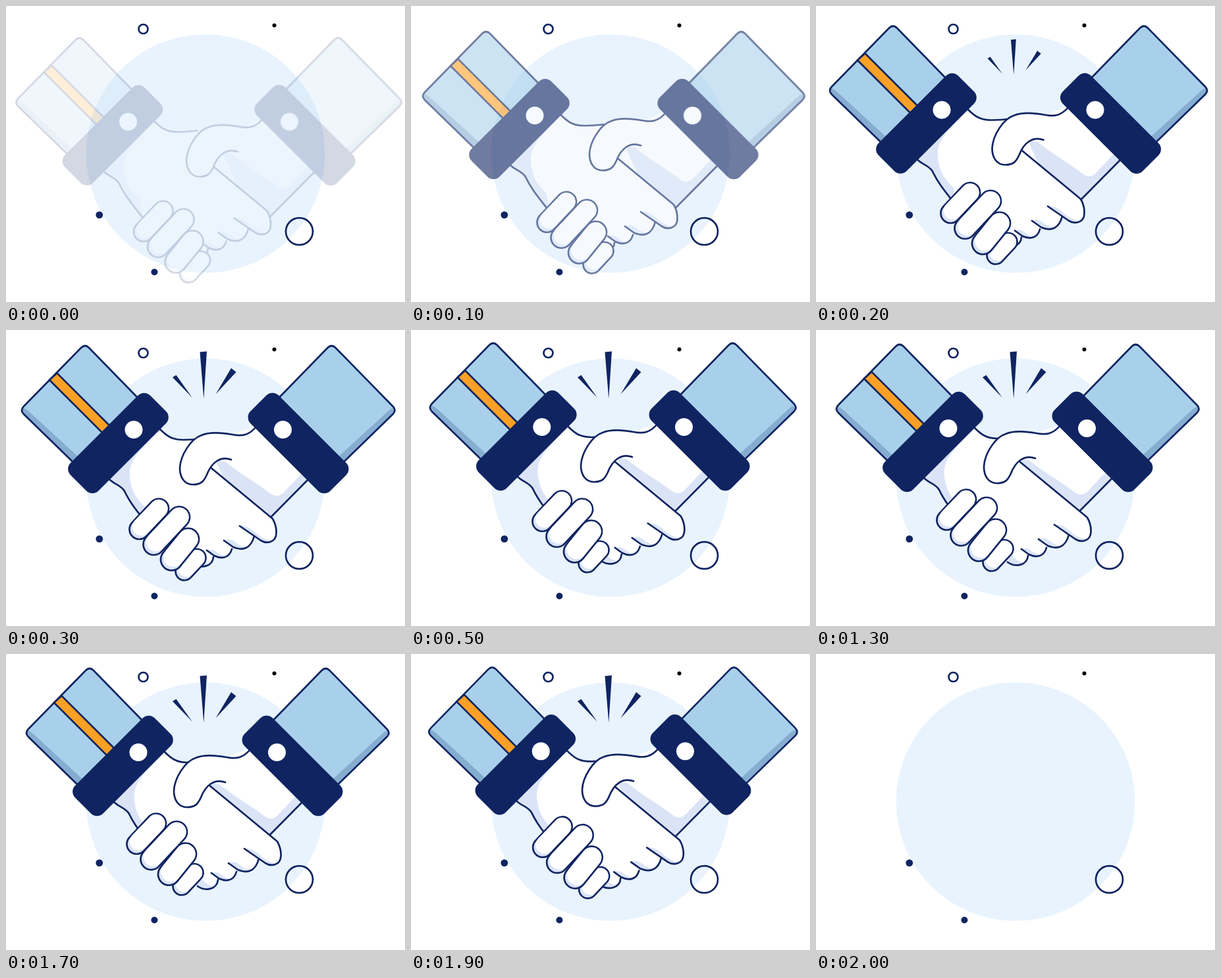
An HTML page for the animation above (2300 ms loop, 606x450 px).

```html
<!DOCTYPE html>
<html lang="en">
<head>
<meta charset="utf-8">
<title>Handshake</title>
<style>
  html, body { margin: 0; width: 100%; height: 100%; overflow: hidden; background: #fff; }
  svg { display: block; width: 100vw; height: 100vh; }
  .line { fill: none; stroke: #0f2461; stroke-width: 2.7; stroke-linecap: round; stroke-linejoin: round; }
  .navy { fill: #0f2461; }
  .white { fill: #fff; }
  .shade { fill: #dbe4f7; }
</style>
</head>
<body>
<svg viewBox="0 0 606 450">
  <defs>
    <g id="sleeve">
      <path fill="#a9d0eb" d="M206 100L133 25Q127 19 121 25L34 114Q28 120 34 126L110 200Z"/>
      <path fill="#86add0" d="M32 117Q29 121 34 126L108 199L116 190L42 122Q35 116 32 117Z"/>
      <path class="line" d="M206 100L133 25Q127 19 121 25L34 114Q28 120 34 126L110 200"/>
    </g>
    <g id="cuff">
      <rect class="navy" x="-85.5" y="-30" width="171" height="60" rx="13" transform="translate(177.5 170) rotate(-45)"/>
      <circle class="white" cx="201" cy="149.5" r="13.5"/>
    </g>
  </defs>

  <circle cx="303" cy="224.5" r="181.3" fill="#e8f3fd"/>
  <circle class="line" cx="208.5" cy="35" r="7"/>
  <circle cx="407.5" cy="29.5" r="3"/>
  <circle class="navy" cx="141.8" cy="317.6" r="5.4"/>
  <circle class="navy" cx="225.4" cy="404.5" r="5"/>
  <circle class="line" cx="445.5" cy="342.7" r="20.5"/>

  <g id="rays" class="navy">
    <path d="M253 72L258.500 68.500L283 103Z" data-tip="283 103"/>
    <path d="M294.500 33.500L305 32.500L300.300 104.500Z" data-tip="300.300 104.500"/>
    <path d="M342 58L349.500 64L318.500 97.500Z" data-tip="318.500 97.500"/>
  </g>

  <g id="shake">
    <g class="right">
      <path class="white" d="M372 143L335 157L300 170L290 215L345 275L378 298L452 223Z"/>
      <path class="shade" d="M309 196L324 198C345 216 372 230 393 247Q402 254 412 246L440 216L452 223L378 298L345 275Z"/>
      <path class="line" d="M452 223L378 298"/>
      <g transform="translate(612.5 0) scale(-1 1)">
        <use href="#sleeve"/><use href="#cuff"/>
      </g>
    </g>

    <g class="left">
      <path class="white" d="M240 148C250 158 258 165 276 165C290 165 298 164 306 163L308 199L400 275L412 285
        C416 292 418 299 417.500 307C417 322 402 323 394 318L384 310C380 331 366 334 352 328
        L350 331C346 346 333 346 323 341C322 357 304 362 291 353L223 295
        C205 272 195 260 187 243C182 234 172 233 164 225Z"/>
      <path class="shade" d="M236 150C216 180 192 192 195 222C197 242 205 255 219 268L223 295C205 272 195 260 187 243C182 234 172 233 164 225Z"/>
      <g class="shade">
        <path d="M362 296L394 318Q402 322 409 318Q396 316 384 304Q372 294 362 296Z"/>
        <path d="M338 318L352 328Q362 333 371 328Q360 326 353 319Q346 314 338 318Z"/>
        <path d="M312 333L323 341Q332 345 340 342Q330 339 325 334Q318 330 312 333Z"/>
        <path d="M288 351Q303 361 316 353Q304 352 298 342Z"/>
      </g>
      <path class="line" d="M240 148C250 158 258 165 276 165C290 165 298 164 306 163
        M164 225C172 233 182 234 187 243C195 260 205 272 223 295
        M308 199L400 275L412 285C416 292 418 299 417.500 307C417 322 402 323 394 318L362 296
        M384 311C379 331 366 334 352 328L338 318
        M350 331C346 346 333 346 323 341L312 333
        M322 343C321 357 304 362 291 353"/>
      <use href="#sleeve"/>
      <path fill="#fba026" stroke="#0f2461" stroke-width="2.7" d="M73 74L84.500 63.500L166 145L154 155Z"/>
      <use href="#cuff"/>
    </g>

    <g class="right">
      <path class="white" d="M371 145C360 158 350 160 335 157C318 154 300 153 288 158C272 163 256 188 255 208C255 222 262 233 275 233C288 233 292 227 296 218C303 200 316 189 333 195Z"/>
      <path class="line" d="M371 145C360 158 350 160 335 157C318 154 300 153 288 158C272 163 256 188 255 208C255 222 262 233 275 233C288 233 292 227 296 218C303 200 316 189 333 195"/>
      <use href="#cuff" transform="translate(612.5 0) scale(-1 1)"/>
    </g>

    <g class="fingers" stroke-linecap="round"></g>
  </g>
</svg>
<script>
const LOOP = 2300, STEP = 100, GONE = 2000;

// Offsets from the resting pose, one value per step.
const path = {
  leftX: [-15.5, -13, -10, -7, -4.5, -2.2, -1, 0],
  rightX: [19, 16, 12.5, 9, 6, 3, 1, 0],
  armY: [26.5, 17, 8.5, 2, -1.5, -2, -1, 0],
  fingerX: [10.5, 8, 6, 4, 2, 1, 0.5, 0],
  fingerY: [54, 40, 26, 14, 6.5, 2, 0.5, 0],
  opacity: [0.18, 0.6, 1],
  rays: [0, 0.37, 0.75, 1]
};

// Upper end, lower end and radius; later fingers lie on top.
const fingers = [
  [286, 332.5, 267, 353, 13.5],
  [272.5, 304, 247.5, 335, 16.5],
  [259, 270.5, 220.5, 312, 16],
  [228, 257.5, 198.5, 289, 15]
];

const $ = selector => [...document.querySelectorAll(selector)];
const shake = $('#shake')[0];
const rays = $('#rays path');

function stroke(x1, y1, x2, y2, width, color) {
  return `<path d="M${x1} ${y1}L${x2} ${y2}" stroke="${color}" stroke-width="${width}"/>`;
}

$('.fingers')[0].innerHTML = fingers.map(([x1, y1, x2, y2, r]) =>
  stroke(x1, y1, x2, y2, 2 * r + 2.7, '#0f2461') +
  stroke(x1, y1, x2, y2, 2 * r - 2.7, '#dbe4f7') +
  stroke(x1, y1, x2 + 3, y2 - 4, 2 * r - 2.7, '#fff')
).join('');

function at(values, time) {
  const last = values.length - 1;
  const p = Math.max(0, Math.min(last, time / STEP));
  const i = Math.min(last - 1, Math.floor(p));
  return values[i] + (values[i + 1] - values[i]) * (p - i);
}

function move(selector, x, y) {
  for (const node of $(selector)) node.setAttribute('transform', `translate(${x} ${y})`);
}

function draw(t) {
  // The hands begin to part again just before they vanish.
  const pose = t < 1710 ? t : 700 - 1.4 * (t - 1710);
  const y = at(path.armY, pose);
  move('.left', at(path.leftX, pose), y);
  move('.right', at(path.rightX, pose), y);
  move('.fingers', at(path.fingerX, pose), at(path.fingerY, pose));

  const visible = t < GONE;
  shake.setAttribute('opacity', visible ? at(path.opacity, t) : 0);
  const size = visible ? at(path.rays, t) : 0;
  for (const ray of rays) {
    const [tx, ty] = ray.dataset.tip.split(' ');
    ray.setAttribute('transform', `translate(${tx} ${ty}) scale(${size}) translate(${-tx} ${-ty})`);
  }
}

const start = performance.now();
function frame() {
  const t = (performance.now() - start) % LOOP;
  draw(Math.floor(t / STEP) * STEP);
  requestAnimationFrame(frame);
}
draw(0);
requestAnimationFrame(frame);
</script>
</body>
</html>
```
